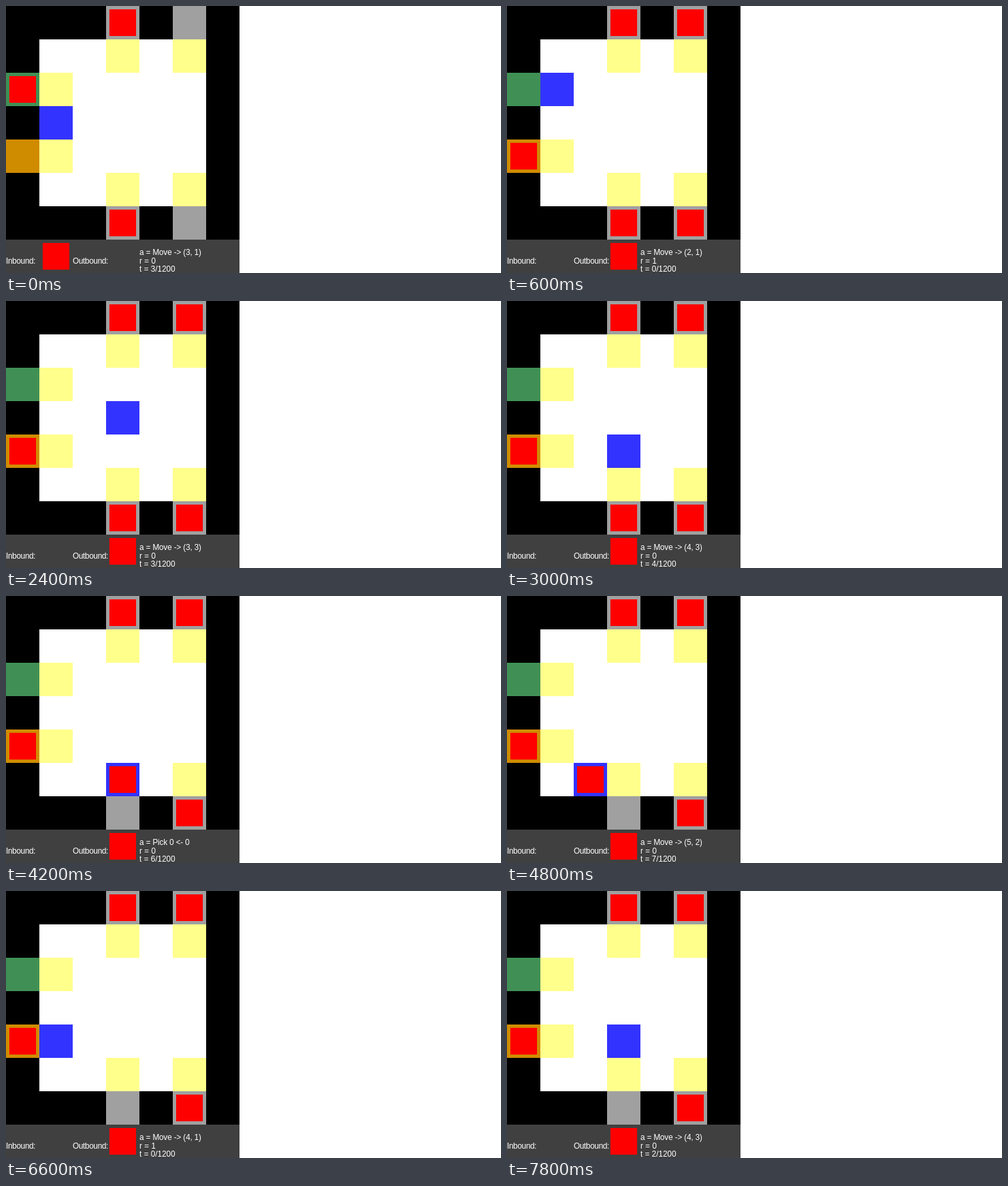
An HTML page for the animation above (8000 ms loop, 742 by 400 pixels).

```html
<!DOCTYPE html>
<html lang="en">
<head>
<meta charset="utf-8">
<title>Warehouse grid</title>
<style>
  html, body { margin: 0; width: 100%; height: 100%; overflow: hidden; background: #fff; }
  svg { display: block; }
  rect { shape-rendering: crispEdges; }
  text { font: 12px "Liberation Sans", Arial, sans-serif; fill: #fff; white-space: pre; }
  .label { letter-spacing: -0.33px; }
  .action { letter-spacing: -0.15px; }
</style>
</head>
<body>
<svg id="stage" width="742" height="400" viewBox="0 0 742 400"></svg>
<script>
const CELL = 50, STEP = 600, LOOP = 8000;
const stage = document.getElementById("stage");

function add(tag, attrs, content = "") {
  const el = document.createElementNS("http://www.w3.org/2000/svg", tag);
  for (const key in attrs) el.setAttribute(key, attrs[key]);
  el.textContent = content;
  return stage.appendChild(el);
}
const rect = (x, y, width, height, fill) => add("rect", { x, y, width, height, fill });
const cell = (row, col, fill) => rect(col * CELL, row * CELL, CELL, CELL, fill);
const item = (row, col) => rect(col * CELL + 5, row * CELL + 5, 40, 40, "#f00");
const label = (x, y, kind, content) => add("text", { x, y, class: kind }, content);
const show = (el, on) => el.setAttribute("visibility", on ? "visible" : "hidden");

// Room, access cells and ports
rect(0, 0, 350, 350, "#000");
rect(50, 50, 250, 250, "#fff");
for (const [row, col] of [[1, 3], [1, 5], [2, 1], [4, 1], [5, 3], [5, 5]]) cell(row, col, "#ffff8c");
for (const [row, col] of [[0, 3], [0, 5], [6, 3], [6, 5]]) cell(row, col, "#a0a0a0");
cell(2, 0, "#409055");
cell(4, 0, "#d08c00");
rect(0, 350, 350, 50, "#404040");

// Stored items and orders
item(0, 3);
const shelf = item(6, 3);
const inbound = [item(2, 0), item(7, 1)];
const outbound = [item(0, 5), item(6, 5), item(4, 0), item(7, 3)];

const agent = cell(0, 0, "#33f");
const load = item(0, 0);

label(0, 386, "label", "Inbound:");
label(100, 386, "label", "Outbound:");
const action = label(200, 373, "action");
const reward = label(200, 386, "");
const timer = label(200, 398, "");

// Agent row and column at each step
const path = [
  [3, 1], [2, 1], [2, 2], [2, 3], [3, 3], [4, 3], [5, 3],
  [5, 3], [5, 2], [4, 2], [4, 1], [4, 1], [4, 2], [4, 3]
];
const PICK = 7, DROP = 11;

function draw(step) {
  const [row, col] = path[step];
  const started = step > 0;
  const shift = `translate(${col * CELL} ${row * CELL})`;
  agent.setAttribute("transform", shift);
  load.setAttribute("transform", shift);
  show(load, step >= PICK && step < DROP);
  show(shelf, step < PICK);
  inbound.forEach(el => show(el, !started));
  outbound.forEach(el => show(el, started));

  const ticks = !started ? 3 : step < DROP ? step - 1 : step - DROP;
  action.textContent = "a = " + (step === PICK ? "Pick 0 <- 0" : `Move -> (${row}, ${col})`);
  reward.textContent = "r = " + (ticks === 0 ? 1 : 0);
  timer.textContent = `t = ${ticks}/1200`;
}

let current = -1;
function tick() {
  const step = Math.floor(performance.now() % LOOP / STEP);
  if (step !== current) draw(current = step);
  requestAnimationFrame(tick);
}
tick();
</script>
</body>
</html>
```
